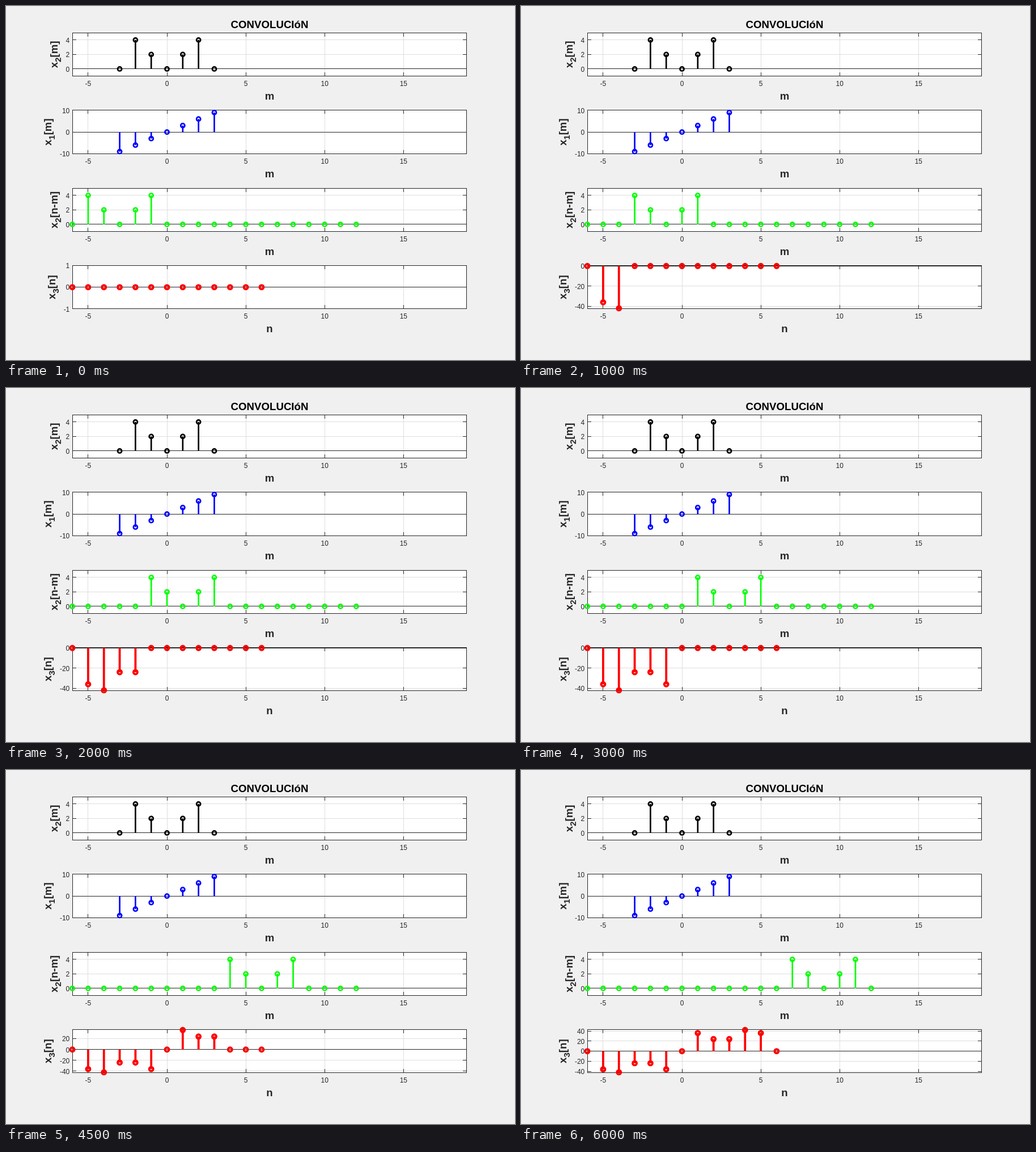
These frames come from a looping animation (898x624 px, 6500 ms). An HTML page:

```html
<!DOCTYPE html>
<html lang="es">
<head>
<meta charset="utf-8">
<title>Convolución</title>
<style>
  html, body { margin: 0; width: 100%; height: 100%; overflow: hidden; background: #f0f0f0; }
  svg { display: block; font-family: "Liberation Sans", Arial, sans-serif; font-size: 12px; fill: #262626; }
  .label { font-size: 18.67px; font-weight: bold; }
  .sub { font-size: 15px; }
</style>
</head>
<body>
<svg width="898" height="624" viewBox="0 0 898 624">
  <text class="label" x="465" y="39" text-anchor="middle" fill="#000">CONVOLUCIóN</text>
  <g id="fixed"></g>
  <g id="moving"></g>
</svg>
<script>
const STEP = 500, STEPS = 13;
const LEFT = 117, RIGHT = 812, HEIGHT = 76.6;
const INK = '#262626', GRID = '#dedede';

const x1 = m => Math.abs(m) <= 3 ? 3 * m : 0;
const x2 = m => Math.abs(m) <= 2 ? [0, 2, 4][Math.abs(m)] : 0;
const range = (a, b, step = 1) =>
  Array.from({ length: Math.floor((b - a) / step) + 1 }, (_, i) => a + i * step);
const x3 = n => range(-3, 3).reduce((sum, m) => sum + x1(m) * x2(n - m), 0);

const xPos = v => 284.02 + 27.82 * v;
const rect = (x, y, w, h, fill) =>
  `<rect x="${x}" y="${y}" width="${w}" height="${h}" fill="${fill}"/>`;
const text = (x, y, str, anchor) =>
  `<text x="${x}" y="${Math.round(y)}" text-anchor="${anchor}">${str}</text>`;

function stems(from, to, f, yPos, color, width) {
  return range(from, to).map(v => {
    const x = xPos(v), y = yPos(f(v));
    const line = f(v) ? `M${x} ${yPos(0)}V${y}` : '';
    return `<g fill="none" stroke="${color}" stroke-width="${width}">` +
      `<path d="${line}"/><circle cx="${x}" cy="${y}" r="3.55"/></g>`;
  }).join('');
}

function plot({ top, lo, hi, ticks, from, to, f, color, width = 2.67, name, index, arg, axis }) {
  const yPos = v => top + HEIGHT * (hi - v) / (hi - lo);
  const t = Math.floor(top), b = Math.floor(top + HEIGHT);
  const w = RIGHT - LEFT + 1, h = b - t + 1;
  let grid = '', marks = '', labels = '';

  for (const v of range(-5, 15, 5)) {
    const x = Math.floor(xPos(v));
    grid += rect(x, t, 1, h, GRID);
    marks += rect(x, t, 1, 7, INK) + rect(x, b - 6, 1, 7, INK);
    labels += text(xPos(v), top + HEIGHT + 17.4, v, 'middle');
  }
  for (const v of ticks) {
    const y = Math.floor(yPos(v));
    grid += rect(LEFT, y, w, 1, GRID);
    marks += rect(LEFT, y, 7, 1, INK) + rect(RIGHT - 6, y, 7, 1, INK);
    labels += text(112.3, yPos(v) + 4.8, v, 'end');
  }

  const frame = rect(LEFT, t, w, 1, INK) + rect(LEFT, b, w, 1, INK) +
    rect(LEFT, t, 1, h, INK) + rect(RIGHT, t, 1, h, INK);
  const baseline = rect(LEFT, Math.floor(yPos(0)), w, 1, INK);

  // The axis name moves away from the widest tick label.
  const tickWidth = Math.max(...ticks.map(v => 6.67 * String(Math.abs(v)).length + (v < 0 ? 4 : 0)));
  const side = `<text class="label" text-anchor="middle" transform="translate(${Math.round(97.3 - tickWidth)} ${top + HEIGHT / 2}) rotate(-90)">` +
    `${name}<tspan class="sub" dy="6">${index}</tspan><tspan dy="-6">[${arg}]</tspan></text>`;
  const below = `<text class="label" x="465" y="${Math.round(top + HEIGHT + 41.4)}" text-anchor="middle">${axis}</text>`;

  return rect(LEFT, t, w, h, '#fff') + grid + frame + marks + baseline +
    stems(from, to, f, yPos, color, width) + labels + side + below;
}

function resultAxis(values) {
  const min = Math.min(...values), max = Math.max(...values);
  if (min === max) return { lo: -1, hi: 1, ticks: [-1, 0, 1] };
  const pad = (max - min) * 0.0135;
  const ticks = range(-40, 40, 20).filter(v => v >= min && v <= max);
  return { lo: min - pad, hi: max + pad, ticks };
}

function moving(k) {
  const result = n => n <= k - 6 ? x3(n) : 0;
  return plot({
    top: 321.1, lo: -1, hi: 5, ticks: [0, 2, 4], from: -6, to: 12,
    f: m => x2(k - 3 - m), color: '#0f0', name: 'x', index: 2, arg: 'n-m', axis: 'm'
  }) + plot({
    top: 457.3, ...resultAxis(range(-6, 6).map(result)), from: -6, to: 6,
    f: result, color: '#f00', width: 3.8, name: 'x', index: 3, arg: 'n', axis: 'n'
  });
}

document.getElementById('fixed').innerHTML = plot({
  top: 47.1, lo: -1, hi: 5, ticks: [0, 2, 4], from: -3, to: 3,
  f: x2, color: '#000', name: 'x', index: 2, arg: 'm', axis: 'm'
}) + plot({
  top: 183.9, lo: -10, hi: 10, ticks: [-10, 0, 10], from: -3, to: 3,
  f: x1, color: '#00f', name: 'x', index: 1, arg: 'm', axis: 'm'
});

const stage = document.getElementById('moving');
const start = performance.now();
let shown = -1;
function draw() {
  const k = Math.floor((performance.now() - start) / STEP) % STEPS;
  if (k !== shown) {
    stage.innerHTML = moving(k);
    shown = k;
  }
  requestAnimationFrame(draw);
}
draw();
</script>
</body>
</html>
```
